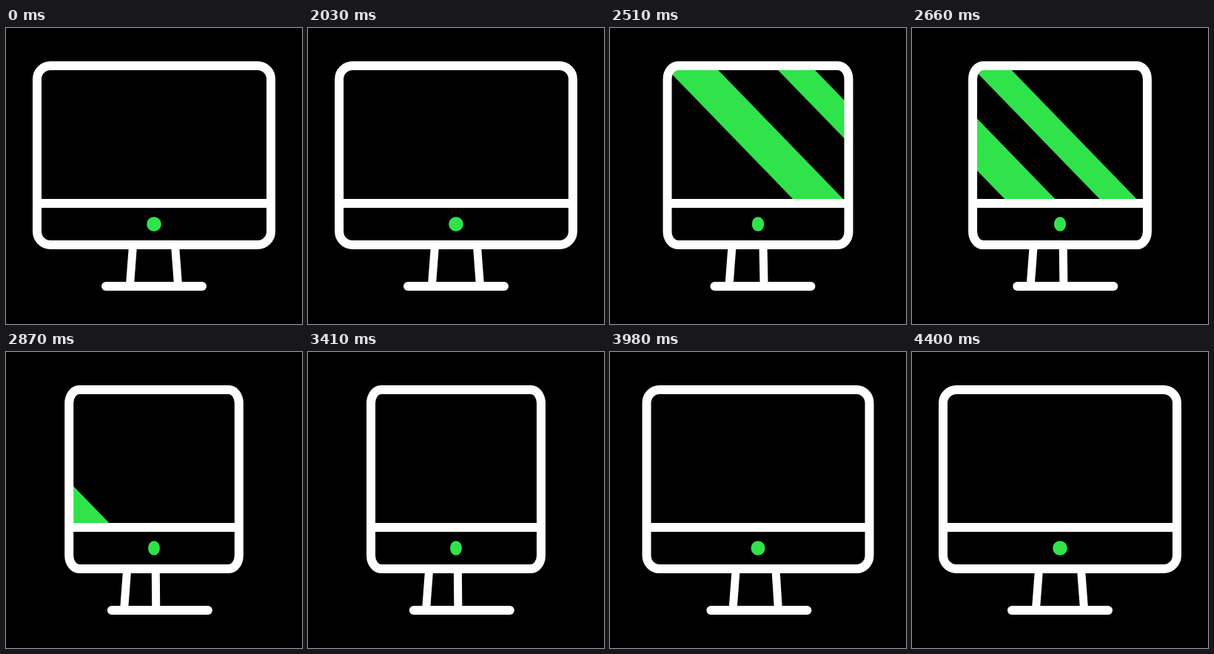
Recreate the animation shown at these times as an HTML page with a canvas. Size 400 px wide and 400 px high, loop 4.43 s.

```html
<!DOCTYPE html>
<html lang="en">
<head>
<meta charset="utf-8">
<title>Turning monitor</title>
<style>
  html, body { margin: 0; width: 100%; height: 100%; overflow: hidden; background: #000; }
  canvas { display: block; width: 400px; height: 400px; }
</style>
</head>
<body>
<canvas id="stage" width="400" height="400"></canvas>
<script>
const ctx = document.getElementById('stage').getContext('2d');
const LOOP = 4430;
const GREEN = '#30e34b';
const SLOPE = 0.97;

const clamp = p => Math.min(1, Math.max(0, p));
const mix = (a, b, p) => a + (b - a) * p;
const easeOut = p => 1 - (1 - p) ** 3;
const easeInOut = p => p < 0.5 ? 4 * p ** 3 : 1 - 4 * (1 - p) ** 3;
const progress = (t, start, length) => clamp((t - start) / length);

function line(x1, y1, x2, y2, width, cap = 'butt') {
  ctx.lineWidth = width;
  ctx.lineCap = cap;
  ctx.beginPath();
  ctx.moveTo(x1, y1);
  ctx.lineTo(x2, y2);
  ctx.stroke();
}

// Rectangle with elliptical corners, squeezed around the middle axis.
function framePath(half, rx, ry) {
  const l = 200 - half, r = 200 + half, t = 51, b = 293, q = Math.PI / 2;
  ctx.beginPath();
  ctx.ellipse(l + rx, t + ry, rx, ry, 0, 2 * q, 3 * q);
  ctx.ellipse(r - rx, t + ry, rx, ry, 0, 3 * q, 4 * q);
  ctx.ellipse(r - rx, b - ry, rx, ry, 0, 0, q);
  ctx.ellipse(l + rx, b - ry, rx, ry, 0, q, 2 * q);
  ctx.closePath();
}

// Diagonal band; x is its centre where it meets the divider.
function band(x, width) {
  const top = x - SLOPE * 191, bottom = x + SLOPE * 9, h = width / 2;
  ctx.beginPath();
  ctx.moveTo(top - h, 40);
  ctx.lineTo(top + h, 40);
  ctx.lineTo(bottom + h, 240);
  ctx.lineTo(bottom - h, 240);
  ctx.fill();
}

function sweepLeft(t) {
  const u = (t - 2510) / 150;
  return 282 - 132.5 * u + 10.5 * u * u;
}

function drawGlints(t, back) {
  if (t > 2030 && t < 3200) {
    band(sweepLeft(t), 68);
    band(sweepLeft(t - 147), 50);
  } else if (t >= 3200) {
    band(191 + 1000 * (back - 0.429), 146);
  }
}

function draw(t) {
  const back = easeInOut(progress(t, 3200, 1200));
  const turn = easeOut(progress(t, 2030, 1140)) - back;
  const half = mix(158, 114, turn);
  const rx = mix(18, 13.5, turn);

  ctx.fillStyle = '#000';
  ctx.fillRect(0, 0, 400, 400);

  ctx.fillStyle = GREEN;
  ctx.save();
  framePath(half, rx, 18);
  ctx.clip();
  drawGlints(t, back);
  ctx.restore();

  ctx.strokeStyle = '#fff';
  line(mix(171.5, 163.5, turn), 294, mix(167.5, 159.5, turn), 347, 11);
  line(mix(228.5, 201.8, turn), 294, mix(232.5, 202.2, turn), 347, 11);
  const shift = 8 * turn;
  line(135 + shift, 349, 265 + shift, 349, 12, 'round');
  line(200 - half, 237, 200 + half, 237, 12);
  framePath(half, rx, 18);
  ctx.lineWidth = 12;
  ctx.stroke();

  ctx.beginPath();
  ctx.ellipse(200, 265, mix(9.8, 7.9, turn), 9.8, 0, 0, 2 * Math.PI);
  ctx.fill();
}

function tick(now) {
  draw(now % LOOP);
  requestAnimationFrame(tick);
}
draw(0);
requestAnimationFrame(tick);
</script>
</body>
</html>
```
